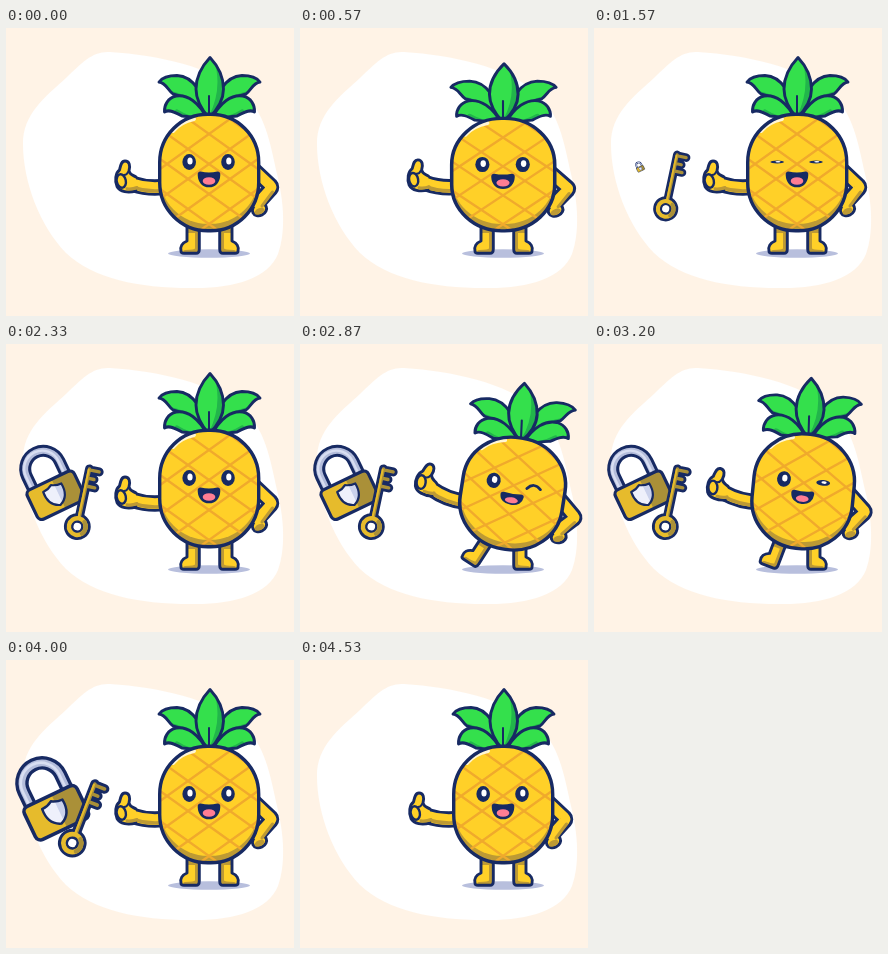
Write an HTML page with a canvas that moves like this. It is 288 px wide and 288 px high and loops after 4.81 s.

```html
<!DOCTYPE html>
<html lang="en">
<head>
<meta charset="utf-8">
<title>Pineapple with lock and key</title>
<style>
html, body { margin: 0; width: 100%; height: 100%; overflow: hidden; background: #fff3e6; }
canvas { display: block; width: 288px; height: 288px; }
</style>
</head>
<body>
<canvas id="stage"></canvas>
<script>
const LOOP = 4810, SIZE = 288, RAD = Math.PI / 180;
const INK = '#172a63', YELLOW = '#ffd028', SHADE = '#bd9a34', LINE = '#f0aa2c';
const GREEN = '#34e04c', LEAF_SHADE = '#22b54b', GOLD = '#e6bb2c', GOLD_DARK = '#aa9038';

const canvas = document.getElementById('stage');
const dpr = window.devicePixelRatio || 1;
canvas.width = canvas.height = SIZE * dpr;
const c = canvas.getContext('2d');
c.lineCap = c.lineJoin = 'round';

// Keys are [time, value] pairs joined by smooth steps.
function track(keys) {
  return t => {
    if (t <= keys[0][0]) return keys[0][1];
    for (let i = 1; i < keys.length; i++) {
      const [a, from] = keys[i - 1], [b, to] = keys[i];
      if (t < b) return from + (to - from) * (1 - Math.cos(Math.PI * (t - a) / (b - a))) / 2;
    }
    return keys[keys.length - 1][1];
  };
}

const stretch = track([[370, 0], [620, -1], [880, 1.03], [960, 1], [1370, 0],
  [2500, 0], [2600, 0.25], [2820, -0.88], [3060, -0.88], [3400, 0.5], [3700, 0]]);
const tilt = track([[2510, 0], [2820, 1], [3060, 1], [3400, 0]]);
const armDrop = track([[420, 0], [620, -2], [900, 24], [990, 24], [1370, 0]]);
const blink = track([[1460, 1], [1550, 0.2], [1590, 0.2], [1700, 1],
  [2040, 1], [2120, 0.15], [2160, 0.15], [2260, 1]]);
const keySize = track([[1380, 0], [1640, 1.12], [1860, 1], [3800, 1], [4060, 1.08], [4480, 0]]);
const keyTurn = track([[3560, 0], [3760, -4], [4050, 10], [4450, 80]]);
const lockSize = track([[1480, 0], [1880, 1.17], [2200, 1], [3850, 1], [4180, 1.28], [4520, 0]]);

function group(draw) {
  c.save();
  draw();
  c.restore();
}

function turn(x, y, deg, sx = 1, sy = sx) {
  c.translate(x, y);
  c.rotate(deg * RAD);
  c.scale(sx, sy);
  c.translate(-x, -y);
}

function shape(path, fill, width = 2.9, ink = INK) {
  if (fill) { c.fillStyle = fill; c.fill(path); }
  if (width) { c.strokeStyle = ink; c.lineWidth = width; c.stroke(path); }
}

// Filled outline with a second tone kept inside it.
function shaded(path, fill, tone, width, color, rim) {
  shape(path, fill, 0);
  group(() => { c.clip(path); shape(tone, null, width, color); });
  shape(path, null, rim);
}

function oval(x, y, rx, ry, fill, width = 0, rot = 0) {
  const p = new Path2D();
  p.ellipse(x, y, rx, ry, rot * RAD, 0, 7);
  shape(p, fill, width);
}

// A thick line with a dark rim.
function tube(path, outer, inner, fill) {
  shape(path, null, outer);
  shape(path, null, inner, fill);
}

function box(x, y, w, h, r) {
  const p = new Path2D();
  p.roundRect(x, y, w, h, r);
  return p;
}

const blob = new Path2D(`M104 24 C86 23 76 35 61 49 C38 70 17 86 17 116 C17 154 34 198 60 225
  C88 251 133 260 184 260 C226 261 262 251 272 226 C280 204 278 174 271 146
  C264 114 259 84 236 64 C206 39 152 27 104 24 Z`);
const body = box(153.7, 86.2, 99, 116.6, 48);
const leaf = new Path2D(`M204 29.5 C196 38 190 49 190 61 C190 73 196 82 203 90
  C211 82 217.5 73 217.5 61 C217.5 49 212 38 204 29.5 Z`);
const leafTone = new Path2D('M214 42 Q218 66 206 90');
const topLeaf = new Path2D(`M202 90 C199 68 188 48 171 47.5 C162 47.5 156 50 153 54
  C160 55 161 61 167 66 C180 69 191 76 202 90 Z`);
const topTone = new Path2D('M202 92 C190 74 180 70 164 66');
const lowLeaf = new Path2D(`M202 92 C193 74 181 66 170 68 C162 70 158 77 158.5 84
  C163 81 169 84 176 88 C184 88 192 92 202 92 Z`);
const lowTone = new Path2D('M201 93 C188 92 180 90 171 84');
const foot = new Path2D(`M181 196 V213 C176 215 174 219 175 223 Q175 225.3 178 225.3
  H190 Q193.3 225.3 193.3 221 V196 Z`);
const footTone = new Path2D('M180 203 H191 V221 Q190 224 179 224');
const rearArm = new Path2D('M247 141 L264.5 157.5 Q266 159 264.5 161 L250 177');
const foreArm = new Path2D('M164 158 Q145 162 127 156');
const hand = new Path2D(`M130 149 C127 147 124 147 123 143 C124.5 138 123.5 133 119 133
  C115 133 114.5 138 113.5 142 C109.5 145 108.5 153 111 158.5 C114 164 122 165 130 163`);
const mouth = new Path2D(`M194.5 144.5 Q203 146.5 211.5 144.5 Q213.5 144.5 213.3 147
  C213 154 209 158.3 203 158.3 C197 158.3 193 154 192.7 147 Q192.5 144.5 194.5 144.5 Z`);
const shield = new Path2D(`M0 -11 C3 -9 6 -8 10 -8 C11 2 8 8 0 11
  C-8 8 -11 2 -10 -8 C-6 -8 -3 -9 0 -11 Z`);
const shackle = new Path2D('M-18 -12 V-29 A18 18 0 0 1 18 -29 V-12');
const plate = box(-26, -16, 52, 32.5, 5);
const shaft = new Path2D('M0 -10 V-59 M0 -58 H10 M0 -49.5 H6.5 M0 -41.5 H9');
const ring = new Path2D();
ring.arc(0, 0, 8.4, 0, 7);

function mirrored(draw) {
  group(() => { c.translate(407, 0); c.scale(-1, 1); draw(); });
}

function drawLeaves(lean) {
  const upper = () => shaded(topLeaf, GREEN, topTone, 6, LEAF_SHADE);
  const lower = () => shaded(lowLeaf, GREEN, lowTone, 5, LEAF_SHADE);
  group(() => {
    turn(203, 88, -6 * lean);
    upper();
    mirrored(upper);
    lower();
    mirrored(lower);
    shaded(leaf, GREEN, leafTone, 7, LEAF_SHADE);
    shape(new Path2D('M203 86 V68'), null, 2);
  });
}

function drawSkin() {
  shape(body, SHADE, 0);
  group(() => {
    c.clip(body);
    group(() => { c.translate(0, -7); shape(body, YELLOW, 0); });
    const net = new Path2D();
    for (let k = -1; k < 5; k++) {
      const y = 106 + 30 * k;
      for (const s of [-1, 1]) {
        net.moveTo(143, y - 43 * s);
        net.lineTo(263, y + 43 * s);
      }
    }
    shape(net, null, 2.4, LINE);
    shape(new Path2D('M167 103 Q174 94 188 91'), null, 4, '#fff6d5');
  });
  shape(body, null, 3.4);
}

function drawEye(x, open) {
  if (open < 0.14) {
    shape(new Path2D(`M${x - 6} 137 Q${x} 129 ${x + 7} 136`), null, 2.8);
    return;
  }
  group(() => {
    turn(x, 134, 0, 1, open);
    oval(x, 134, 6.8, 7.9, INK);
    oval(x + 0.8, 133, 2.6, 3.5, '#fff');
  });
}

function drawFace(t, lean) {
  const lid = blink(t);
  drawEye(183.2, lid);
  drawEye(222, Math.min(lid, 1 - lean));
  group(() => {
    turn(203, 146, 0, 1, 1 - 0.22 * lean);
    shape(mouth, INK, 2);
    oval(203, 153, 6.3, 3.8, '#ff7d93');
  });
}

function drawFeet(lean) {
  const draw = () => shaded(foot, YELLOW, footTone, 4, SHADE);
  group(() => {
    c.translate(-2 * lean, -lean);
    turn(187, 200, 33 * lean);
    draw();
  });
  mirrored(draw);
}

function drawThumb(t, lean, wide) {
  const drop = armDrop(t);
  group(() => {
    c.translate(4 * lean - 45 * (wide - 1), -2 * lean);
    turn(158, 158, 18 * lean - drop, 1 - Math.max(0, drop) * 0.006);
    tube(foreArm, 16.5, 10.6, YELLOW);
    group(() => { c.translate(0, 3.4); shape(foreArm, null, 3.6, SHADE); });
    shape(hand, YELLOW);
    shape(new Path2D('M121 160.8 Q126 161.5 131 159.5'), null, 3, SHADE);
    oval(115.3, 153, 4.5, 6.8, YELLOW, 2.4, -12);
    shape(new Path2D('M122 144 Q121 147 118 147'), null, 2);
  });
}

function drawRearArm() {
  tube(rearArm, 16, 10, YELLOW);
  oval(253.5, 181.5, 7.3, 6, YELLOW, 2.9, -25);
  shape(new Path2D('M252 177 L264 162'), null, 8, YELLOW);
  shape(new Path2D('M256 178 L266.5 164'), null, 3, SHADE);
  oval(253.5, 183.3, 5.3, 3, SHADE, 0, -25);
}

function drawPineapple(t) {
  const lean = tilt(t), s = stretch(t);
  const sy = 1 + 0.04 * s, sx = 1 - (s < 0 ? 0.045 : 0.025) * s;
  drawFeet(lean);
  drawThumb(t, lean, sx);
  group(() => {
    c.translate(203 + 9.5 * lean, 203 - 59 * sy + 3 * lean);
    c.rotate(9 * lean * RAD);
    c.scale(sx, sy);
    c.translate(-203, -144);
    drawRearArm();
    drawLeaves(lean);
    drawSkin();
    drawFace(t, lean);
  });
}

function drawLock(t) {
  const size = lockSize(t);
  if (size < 0.01) return;
  group(() => {
    turn(46, 139, 0, size);
    c.translate(49.7, 151);
    c.rotate(-25.5 * RAD);
    tube(shackle, 12, 6, '#b4bddb');
    group(() => { c.translate(-0.9, -0.6); shape(shackle, null, 2.4, '#d8def2'); });
    shaded(plate, GOLD, new Path2D('M17 -20 V20'), 28, GOLD_DARK, 3.2);
    shaded(shield, '#eef0fb', new Path2D('M8 -12 V12'), 10, '#cbd2ec', 2.2);
  });
}

function drawKey(t) {
  const size = keySize(t);
  if (size < 0.01) return;
  group(() => {
    turn(78, 155, keyTurn(t), size);
    c.translate(71.3, 182.6);
    c.rotate(12 * RAD);
    shape(shaft, null, 9);
    shape(ring, null, 10);
    shape(shaft, null, 3.4, GOLD_DARK);
    shape(ring, null, 4.4, GOLD);
    shape(new Path2D('M-0.7 -10 V-58'), null, 2, GOLD);
    shape(new Path2D('M6 6 A8.4 8.4 0 0 0 6 -6'), null, 4.2, GOLD_DARK);
    oval(0, 0, 3.8, 3.8, '#fff');
  });
}

function render(t) {
  c.setTransform(dpr, 0, 0, dpr, 0, 0);
  c.fillStyle = '#fff3e6';
  c.fillRect(0, 0, SIZE, SIZE);
  shape(blob, '#fff', 0);
  oval(203, 225.5, 41, 4.2, '#b8bfdd');
  drawPineapple(t);
  drawLock(t);
  drawKey(t);
}

const start = performance.now();
function tick() {
  render((performance.now() - start) % LOOP);
  requestAnimationFrame(tick);
}
tick();
</script>
</body>
</html>
```
